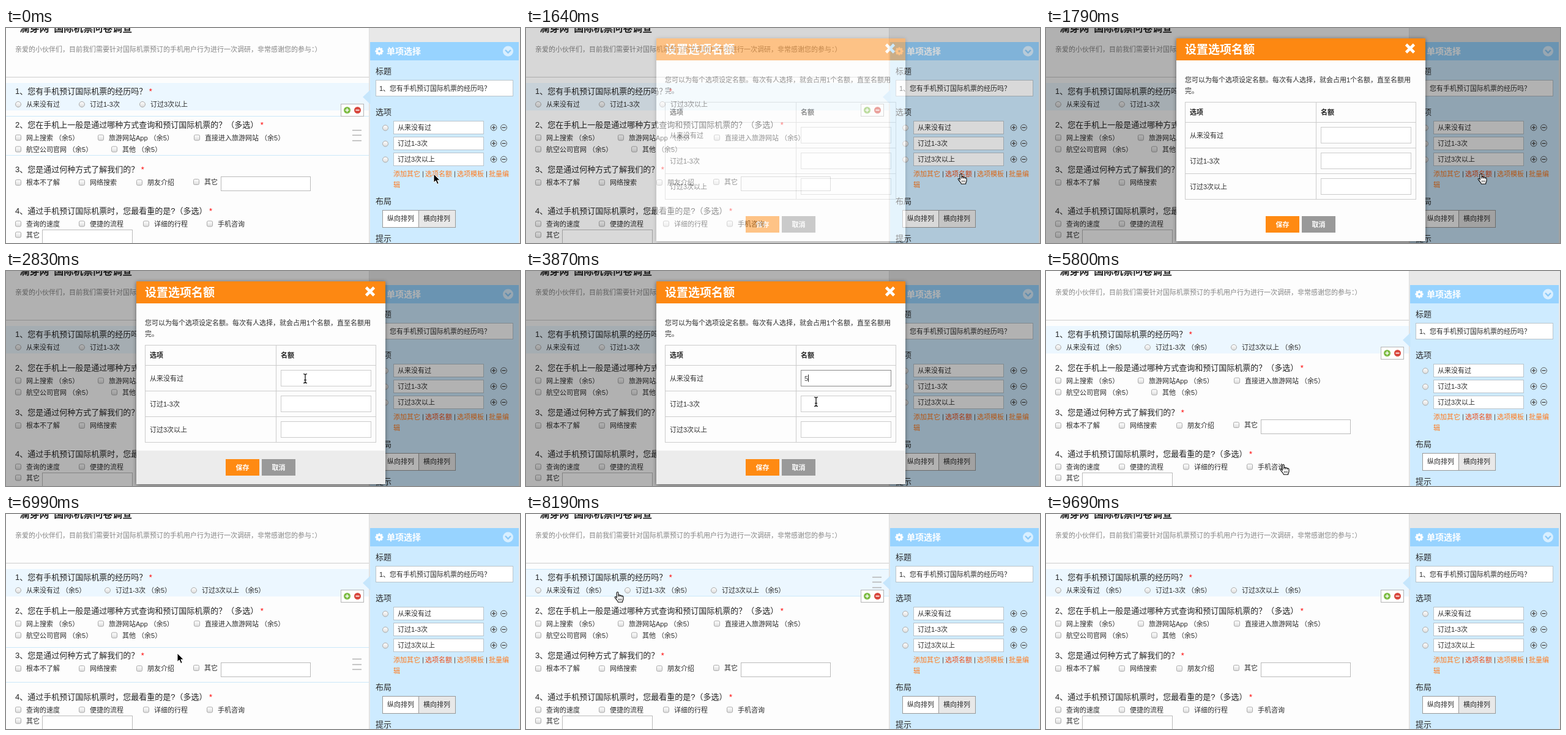
An HTML page that plays this animation: 840x352 px, repeating every 9.98 s.

```html
<!DOCTYPE html>
<html lang="zh-CN">
<head>
<meta charset="utf-8">
<title>选项名额</title>
<style>
html, body { margin: 0; width: 100%; height: 100%; overflow: hidden; background: #fdfdfd; }
svg { display: block; width: 840px; height: 352px; font-family: "Liberation Sans", "Noto Sans CJK SC", "Noto Sans CJK", sans-serif; }
.dialog-box { filter: drop-shadow(0 1px 3px rgba(0, 0, 0, .45)); }
</style>
</head>
<body>
<svg id="stage" viewBox="0 0 840 352" xmlns="http://www.w3.org/2000/svg"></svg>
<script>
const LOOP = 9980;
const INK = '#2b2b2b', LINK = '#ff7a1c', ACTIVE = '#ee4a12';

// Helpers: y of a text is its visual middle
const text = (x, y, s, size = 11, fill = INK, more = '') =>
  `<text x="${x}" y="${y + size * .38}" font-size="${size}" fill="${fill}" ${more}>${s}</text>`;
const bold = (x, y, s, size, fill, more = '') => text(x, y, s, size, fill, 'font-weight="700" ' + more);
const rect = (x, y, w, h, fill, stroke, more = '') => stroke
  ? `<rect x="${x + .5}" y="${y + .5}" width="${w - 1}" height="${h - 1}" fill="${fill}" stroke="${stroke}" ${more}/>`
  : `<rect x="${x}" y="${y}" width="${w}" height="${h}" fill="${fill}" ${more}/>`;
const line = (d, stroke, width = 1, more = '') =>
  `<path d="${d}" fill="none" stroke="${stroke}" stroke-width="${width}" ${more}/>`;
const circle = (x, y, r, fill, stroke = 'none') =>
  `<circle cx="${x}" cy="${y}" r="${r}" fill="${fill}" stroke="${stroke}"/>`;
const group = (id, body) => `<g id="${id}">${body}</g>`;

const radio = (x, y, s) => circle(x, y, 4.5, 'url(#knob)', '#aaa') + (s ? text(x + 13, y, s) : '');
const check = (x, y, s) => rect(x - 5, y - 5, 10, 10, 'url(#knob)', '#aaa', 'rx="2"') + text(x + 13, y, s);
const question = (y, s) => text(15, y, `${s} <tspan fill="#f00">*</tspan>`, 13, '#222');
const sign = (x, y, r, plus, fill, stroke, ink) => circle(x, y, r, fill, stroke) +
  line(`M${x - 3} ${y}h6` + (plus ? `M${x} ${y - 3}v6` : ''), ink, 1.6);

const left = [1, 2, 3, 4].length && (
  bold(15, -.5, '"澜芽网"国际机票问卷调查', 16, '#222') +
  text(15, 34.5, '亲爱的小伙伴们，目前我们需要针对国际机票预订的手机用户行为进行一次调研，非常感谢您的参与：）', 11, '#858585') +
  line('M0 80.5H594', '#ccc') +
  rect(0, 90, 594, 45, '#ecf7ff') +
  group('hover', '') +
  question(103.5, '1、您有手机预订国际机票的经历吗？') +
  group('plain', radio(20, 125, '从来没有过') + radio(124, 125, '订过1-3次') + radio(223, 125, '订过3次以上')) +
  group('quota', radio(20, 125, '从来没有过 （余5）') + radio(166, 125, '订过1-3次 （余5）') + radio(307, 125, '订过3次以上 （余5）')) +
  question(158.5, '2、您在手机上一般是通过哪种方式查询和预订国际机票的？（多选）') +
  check(20, 179.5, '网上搜索 （余5）') + check(155, 179.5, '旅游网站App （余5）') + check(312, 179.5, '直接进入旅游网站 （余5）') +
  check(20, 198.5, '航空公司官网 （余5）') + check(177, 198.5, '其他 （余5）') +
  question(231.5, '3、您是通过何种方式了解我们的？') +
  check(20, 253, '根本不了解') + check(124, 253, '网络搜索') + check(218, 253, '朋友介绍') + check(311, 252, '其它') +
  rect(351, 243, 147, 24, '#fff', '#bbb') +
  question(299.5, '4、通过手机预订国际机票时，您最看重的是?（多选）') +
  check(20, 320.5, '查询的速度') + check(124, 320.5, '便捷的流程') + check(229, 320.5, '详细的行程') + check(333, 320.5, '手机咨询') +
  check(20, 338.5, '其它') + rect(59, 330, 148, 30, '#fff', '#bbb'));

const gear = circle(610, 38, 3.6, 'none', '#fff').replace('/>', ' stroke-width="3.4"/>') +
  [0, 45, 90, 135].map(a => line('M610 31.4v2.6M610 42v2.6', '#fff', 2.8, `transform="rotate(${a} 610 38)"`)).join('');

const choice = (s, i) => {
  const y = 163 + 26 * i;
  return radio(620, y + .5) + rect(633, y - 11, 148, 22, '#fff', '#b9c4cb') + text(640, y, s) +
    sign(797, y, 4.9, true, 'none', '#555', '#555') + sign(813.5, y, 4.9, false, 'none', '#555', '#555');
};

const panel =
  rect(594, 0, 246, 352, '#e8e8e8') + line('M593.5 0V352', '#ddd') +
  rect(595, 23, 243, 329, '#ceebff') + rect(595, 23, 243, 30, '#97d3ff') +
  '<path d="M595.5 101L583 113 595.5 125Z" fill="#c6e6fc"/>' +
  gear + bold(622, 38, '单项选择', 14, '#fff') +
  circle(820.5, 38, 8.5, '#d9efff') + line('M816 36l4.5 4.5 4.5-4.5', '#8ccaf8', 2.4) +
  text(604, 70, '标题', 13) + rect(604, 85, 225, 27, '#fff', '#b9c4cb') +
  text(610, 98.5, '1、您有手机预订国际机票的经历吗？') +
  text(604, 137.5, '选项', 13) + ['从来没有过', '订过1-3次', '订过3次以上'].map(choice).join('') +
  text(633, 239, '添加其它', 11, LINK) + text(685, 239, '选项名额', 11, LINK, 'id="link"') +
  text(737, 239, '选项模板', 11, LINK) + text(789, 239, '批量编', 11, LINK) + text(633, 257, '辑', 11, LINK) +
  [681.5, 733.5, 785.5].map(x => line(`M${x} 234.5v10`, '#555')).join('') +
  text(604, 283, '布局', 13) +
  rect(615, 298, 60, 29, '#fff', '#999') + rect(674, 298, 61, 29, '#e8e8e8', '#999') +
  text(623, 312, '纵向排列') + text(682, 312, '横向排列') + text(604, 344.5, '提示', 13) +
  rect(547, 124, 38, 21, '#fff', '#b5b5b5') +
  sign(557.5, 134.5, 5.5, true, '#7dbb42', 'none', '#fff') + sign(574.5, 134.5, 5.5, false, '#d8473d', 'none', '#fff');

const quotaRow = (s, i) => {
  const y = 175.5 + 42 * i;
  return text(235, y, s) + rect(449, y - 13.5, 148, 27, '#fff', '#ccc', `id="box${i}"`) +
    text(455, y + .5, '5', 11, '#444', `id="val${i}"`);
};

const dialog =
  rect(0, 0, 840, 352, '#000', '', 'opacity=".3"') +
  rect(213, 17, 407, 332, '#fdfdfd', '', 'class="dialog-box"') + rect(213, 17, 407, 36, '#fd8812') +
  bold(227, 35, '设置选项名额', 19, '#fff') + line('M588.5 27l13 13m0-13l-13 13', '#fff', 4.6) +
  text(227, 85, '您可以为每个选项设定名额。每次有人选择，就会占用1个名额，直至名额用') + text(227, 103, '完。') +
  rect(227, 121, 378, 160, 'none', '#ccc') + line('M227 154.5H605M227 196.5H605M227 238.5H605M441.5 121V281', '#ccc') +
  bold(235, 138, '选项', 11, '#222') + bold(449, 138, '名额', 11, '#222') +
  ['从来没有过', '订过1-3次', '订过3次以上'].map(quotaRow).join('') +
  rect(213, 294, 407, 55, '#ececec', '', 'id="footer"') +
  rect(359, 308, 55, 27, '#ff8a12') + rect(418, 308, 55, 27, '#999') +
  bold(386.5, 321.5, '保存', 11, '#fff', 'text-anchor="middle"') + bold(445.5, 321.5, '取消', 11, '#fff', 'text-anchor="middle"') +
  line('M0 -6v12', '#222', 1, 'id="caret"');

const pointers =
  group('arrow', '<path d="M0 0V14L3.3 11 5.7 16.6 8.2 15.5 5.8 10.2H10.2Z" fill="#000" stroke="#fff"/>') +
  group('hand', '<path d="M4.2 10V2.2C4.2 .3 7 .3 7 2.2V6.2C7.8 5.2 9.5 5.5 9.7 6.6 10.6 5.8 12.2 6.2 12.4 7.4 13.4 6.8 15 7.3 15 9V12C15 14 13.6 15 13.6 17.2H6.4C6.2 15 2.6 12.2 1.4 10 .6 8.3 2.8 7.6 4.2 10Z" fill="#fff" stroke="#000" stroke-width="1.1"/>' +
    line('M7 6.2V9M9.7 6.6V9M12.4 7.4V9.4M7.6 11.5v3M9.8 11.5v3M12 11.5v3', '#000', .8)) +
  group('beam', line('M-3 -7.5Q0 -7.5 0 -5.5V5.5Q0 7.5 -3 7.5M3 -7.5Q0 -7.5 0 -5.5M0 5.5Q0 7.5 3 7.5M-2 2.5H2', '#000', 1.2));

document.getElementById('stage').innerHTML =
  '<defs><linearGradient id="knob" x2="0" y2="1"><stop stop-color="#fff"/><stop offset="1" stop-color="#dcdcdc"/></linearGradient></defs>' +
  rect(0, 0, 840, 352, '#fdfdfd') + left + panel + group('dialog', dialog) + pointers;

// Step tracks: [time, value...]
const pointer = [
  [0, 'arrow', 699, 239], [450, 'hand', 703, 238], [600, 'hand', 705, 238],
  [2240, 'hand', 690, 232], [2390, 'arrow', 627, 210], [2540, 'beam', 551, 184], [2690, 'beam', 506, 177], [2830, 'beam', 489, 176],
  [3720, 'beam', 478, 200], [3870, 'beam', 474, 214], [4320, 'beam', 474, 257],
  [4770, 'beam', 468, 263], [4910, 'arrow', 442, 284], [5060, 'arrow', 412, 303], [5200, 'hand', 388, 315], [5350, 'hand', 382, 316],
  [6240, 'arrow', 388, 317], [6540, 'arrow', 382, 311], [6690, 'arrow', 360, 291], [6840, 'arrow', 322, 261], [6990, 'arrow', 280, 228],
  [7140, 'arrow', 236, 197], [7290, 'arrow', 200, 172], [7440, 'arrow', 174, 151],
  [7590, 'arrow', 156, 132], [7740, 'arrow', 149, 128], [8190, 'hand', 144, 127],
  [8940, 'arrow', 520, 262], [9090, 'arrow', 798, 341], [9390, 'arrow', 800, 344], [9540, 'arrow', 801, 348], [9690, 'none', 0, 0]
];
const hovered = [[0, 2], [1640, 0], [6090, 4], [6840, 3], [7140, 2], [7590, 1], [8940, 0]];
const fade = [[0, 0], [1640, .5], [1790, 1], [5800, 0]];
const focus = [[0, -1], [3280, 0], [4020, 1], [4470, 2], [4910, -1]];
const typed = [3580, 4320, 4620];
const rows = [null, [90, 134], [144, 208], [218, 275], [285, 360]];

const at = (track, t) => track.filter(k => k[0] <= t).pop().slice(1);
const $ = id => document.getElementById(id);
const show = (id, on) => $(id).setAttribute('display', on ? 'inline' : 'none');

const hoverRow = n => {
  if (!n) return '';
  const [top, bottom] = rows[n], mid = (top + Math.min(bottom, 352)) / 2;
  const bars = [-9.5, -1, 7.5].map(d => `M566 ${Math.round(mid + d) + .5}h15`).join('');
  return line(`M0 ${top + .5}H594M0 ${bottom + .5}H594`, '#cbe8f9') + line(bars, '#b3b3b3', 1.3);
};

let lastRow = -1;
function draw(t) {
  const [kind, x, y] = at(pointer, t);
  for (const k of ['arrow', 'hand', 'beam']) show(k, k === kind);
  if (kind !== 'none') $(kind).setAttribute('transform', `translate(${x} ${y})`);

  const [row] = at(hovered, t);
  if (row !== lastRow) $('hover').innerHTML = hoverRow(lastRow = row);

  const saved = t >= 5800;
  show('plain', !saved);
  show('quota', saved);
  $('link').setAttribute('fill', t >= 450 ? ACTIVE : LINK);

  const [opacity] = at(fade, t), [field] = at(focus, t);
  show('dialog', opacity > 0);
  $('dialog').setAttribute('opacity', opacity);
  show('footer', t >= 2240);
  typed.forEach((start, i) => {
    show('val' + i, t >= start);
    $('box' + i).setAttribute('stroke', i === field ? '#8a8a8a' : '#ccc');
  });
  show('caret', field >= 0);
  if (field >= 0) $('caret').setAttribute('transform', `translate(${t >= typed[field] ? 461.5 : 455.5} ${175.5 + 42 * field})`);
}

const start = performance.now();
function tick() {
  draw((performance.now() - start) % LOOP);
  requestAnimationFrame(tick);
}
tick();
</script>
</body>
</html>
```
